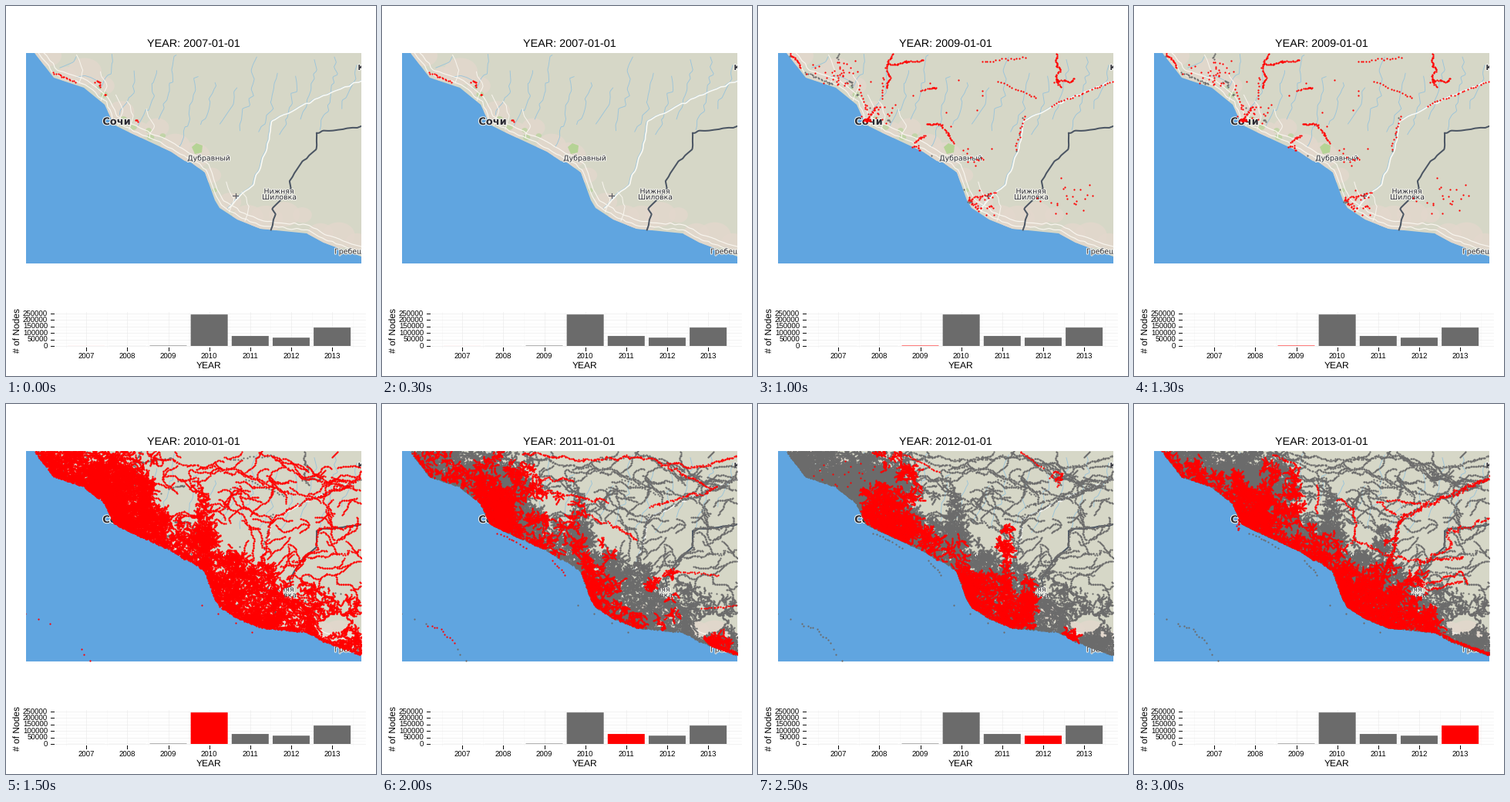
A matplotlib script for the animation above (3500 ms loop, 480 px wide and 480 px high).

```python
import numpy as np
import matplotlib.pyplot as plt
from matplotlib.animation import FuncAnimation
from matplotlib.patches import Ellipse, Polygon, Rectangle
from matplotlib.patheffects import withStroke

plt.rcParams["text.hinting"] = "none"
RED, GREY = "#ff0000", "#6b6b6b"
LEFT, TOP, RIGHT, BOTTOM = 26, 61, 461, 333.5
YEARS = range(2007, 2014)
NODES = [200, 300, 3000, 243000, 77000, 64000, 142000]
rng = np.random.default_rng(2014)

COAST = np.array([
    (37, 61), (62, 93), (101, 106), (128, 128), (140, 154), (160, 164),
    (214, 189), (232, 201), (240, 203), (258, 216), (271, 252), (277, 262),
    (300, 277), (330, 289), (390, 295), (412, 307), (461, 325)], float)
BORDER = [(461, 156), (430, 161), (403, 164), (404, 186), (385, 201),
          (368, 227), (370, 237), (345, 263), (349, 270), (344, 290)]
VALLEY = [(461, 96), (380, 130), (344, 149), (336, 190), (318, 232), (288, 262)]
CLEARINGS = [(368, 243, 10, 7), (428, 284, 16, 12)]


# --- geometry ---
def shore_y(x):
    return np.interp(x, *COAST.T)


def wiggle(pts, step=1.3, amp=1.0):
    """Resample a path and let it wander slightly."""
    pts = np.asarray(pts, float)
    dist = np.r_[0, np.cumsum(np.hypot(*np.diff(pts, axis=0).T))]
    at = np.linspace(0, dist[-1], max(2, int(dist[-1] / step)))
    knots = np.linspace(0, dist[-1], max(3, int(dist[-1] / 6)))
    return np.column_stack([
        np.interp(at, dist, axis) + np.interp(at, knots, rng.normal(0, amp, len(knots)))
        for axis in pts.T])


def walks(x, y, heading, steps, turn, step):
    """Winding lines of dots from each start, of varied length."""
    n = len(x)
    angle = heading[:, None] + rng.normal(0, turn, (n, steps)).cumsum(axis=1)
    px = x[:, None] + step * np.cos(angle).cumsum(axis=1)
    py = y[:, None] + step * np.sin(angle).cumsum(axis=1)
    keep = np.arange(steps) < rng.integers(steps // 2, steps + 1, (n, 1))
    return np.c_[px[keep], py[keep]]


def blocks(x0, x1, depth, n, size=6, streets=6):
    """City blocks scattered over a band between the shore and the hills."""
    x = rng.uniform(x0, x1, n)
    y = shore_y(x) - depth * rng.random(n) ** 1.2
    reach = np.repeat(size * rng.uniform(0.4, 1, n), streets)
    reach *= np.sqrt(rng.random(n * streets))
    turn = rng.uniform(0, 2 * np.pi, n * streets)
    x = np.repeat(x, streets) + reach * np.cos(turn)
    y = np.repeat(y, streets) + reach * np.sin(turn)
    return walks(x, y, 2 * turn, 9, 0.3, 1.2)


def shore(x0, x1, width):
    line = wiggle(COAST, 0.3, 0)
    line = line[(line[:, 0] > x0) & (line[:, 0] < x1)]
    return line + rng.uniform(-width, width, line.shape)


def trail(*pts, step=1.2, amp=1.6, thick=0.5):
    line = wiggle(pts, step, amp)
    return line + rng.normal(0, thick, line.shape)


def dotted(*pts, step=3.5):
    return trail(*pts, step=step, amp=0.6)


def sprinkle(x, y, spread, n):
    return rng.normal((x, y), (spread, spread / 2), (n, 2))


def hill_paths(n):
    x, y = rng.uniform(180, RIGHT, n), rng.uniform(TOP, 290, n)
    heading = rng.normal(0, 0.6, n) + np.pi * rng.integers(0, 2, n)
    return walks(x, y, heading, 36, 0.28, 1.5)


def ashore(*parts):
    p = np.vstack(parts)
    x, y = p.T
    keep = (x < RIGHT) & (y > TOP) & (y < shore_y(x) + 1)
    for cx, cy, rx, ry in CLEARINGS:
        keep &= np.hypot((x - cx) / rx, (y - cy) / ry) > 1
    return p[keep]


# --- nodes added in each year ---
def nodes_2007():
    return np.vstack([
        trail((61, 86), (72, 91), (89, 98), amp=0.4, step=1.8),
        trail((116, 97), (121, 98), (122, 104), amp=0.4),
        sprinkle(129, 114.5, 0.6, 3), sprinkle(169, 149, 1.5, 4)])


def nodes_2008():
    return np.vstack([
        trail((104, 62), (103, 69), amp=0.3), sprinkle(94, 100, 1.2, 5),
        sprinkle(41, 65, 1, 2), sprinkle(146, 132, 0.5, 1),
        dotted((344, 144), (335, 188), step=12), sprinkle(274, 254, 1.5, 5),
        dotted((225, 194), (266, 238), step=30)])


def nodes_2009():
    return ashore(
        trail((173, 61), (167, 72), (169, 108)), trail((168, 74), (212, 71)),
        trail((38, 62), (55, 76)), trail((213, 110), (231, 108)),
        trail((388, 61), (385, 72), (394, 80), (386, 92), (392, 107)),
        trail((386, 96), (412, 95)), trail((218, 153), (239, 154), (252, 177)),
        trail((203, 178), (216, 168)), trail((200, 182), (213, 187)),
        trail((140, 151), (144, 141), (153, 130)), sprinkle(141, 148, 2, 30),
        dotted((312, 98), (362, 119)), dotted((380, 129), (461, 98)),
        dotted((290, 73), (347, 66)), dotted((345, 144), (334, 185)),
        dotted((274, 251), (307, 242), step=2), dotted((274, 250), (286, 265), step=2),
        dotted((130, 104), (141, 135)), dotted((162, 92), (162, 120)),
        sprinkle(108, 88, 18, 40), sprinkle(155, 140, 15, 20),
        sprinkle(280, 197, 12, 12), sprinkle(295, 258, 15, 25),
        sprinkle(398, 252, 24, 24), sprinkle(250, 125, 30, 8))


def nodes_2010():
    land = ashore(
        hill_paths(165), shore(37, 350, 5), shore(350, RIGHT, 3),
        blocks(40, 130, 45, 150), blocks(115, 185, 85, 260), blocks(130, 190, 120, 60),
        blocks(185, 262, 45, 80), blocks(245, 275, 100, 45), blocks(258, 345, 80, 170),
        blocks(340, 400, 60, 65), blocks(395, RIGHT, 65, 45),
        trail(*VALLEY), trail(*BORDER[:6]), trail((190, 70), (310, 92), (375, 118)),
        trail((330, 61), (385, 95), (461, 112)), trail((370, 205), (461, 190)))
    sea = [dotted((26, 271), (57, 285), step=9), dotted((97, 317), (108, 333), step=6),
           dotted((253, 261), (320, 296), step=16)]
    return np.vstack([land, *sea])


def nodes_2011():
    land = ashore(
        shore(40, 62, 4), shore(125, 215, 5), shore(260, 342, 4), shore(425, RIGHT, 3),
        blocks(125, 172, 50, 120), blocks(45, 130, 35, 28), blocks(140, 200, 100, 45),
        blocks(190, 255, 80, 32), blocks(250, 300, 110, 14), blocks(262, 285, 45, 32),
        blocks(290, 340, 60, 18), blocks(345, 380, 80, 12), blocks(425, 450, 14, 16),
        trail((180, 63), (260, 72), (340, 68), (390, 90), (425, 108)),
        trail((372, 76), (405, 82), (461, 68)), trail((348, 133), (436, 107)),
        trail((186, 82), (205, 98), (248, 97)), trail((205, 112), (293, 127)),
        trail((250, 140), (315, 165), (331, 178)),
        dotted((380, 216), (437, 222), step=2.2), dotted((415, 265), (461, 262), step=2.2))
    sea = [dotted((60, 287), (75, 292), (94, 309)), dotted((150, 167), (186, 186)),
           dotted((220, 203), (239, 222))]
    return np.vstack([land, *sea])


def nodes_2012():
    return ashore(
        shore(134, 200, 4), shore(258, 344, 4),
        blocks(136, 195, 45, 85), blocks(150, 212, 110, 65, 5), blocks(195, 262, 30, 25, 5),
        blocks(260, 285, 45, 50), blocks(285, 350, 60, 85), blocks(313, 327, 130, 26),
        blocks(345, 358, 65, 18, 5), blocks(398, 410, 5, 8, 4),
        trail((180, 68), (212, 110)), trail((378, 92), (396, 85), (389, 106)),
        sprinkle(388, 97, 3, 20), dotted((184, 62), (235, 88), step=2),
        dotted((340, 61), (368, 83), step=2), sprinkle(110, 90, 30, 30))


def nodes_2013():
    inland = trail((376, 203), (410, 185), (406, 165), (461, 149), thick=0.7)
    pier = trail((135, 150), (137, 164), amp=0.2, thick=1)
    return np.vstack([pier, ashore(
        inland, shore(37, 65, 4), shore(90, 260, 4), shore(258, 400, 5),
        shore(400, RIGHT, 2), blocks(132, 175, 50, 120), blocks(40, 130, 28, 28, 5),
        blocks(165, 215, 95, 65, 5), blocks(210, 262, 40, 25), blocks(262, 350, 55, 160),
        blocks(345, 392, 25, 35), blocks(300, 345, 110, 25), blocks(355, 372, 75, 18, 5),
        *[trail(*VALLEY[:5], thick=0.9) for _ in range(2)],
        trail((314, 126), (340, 143)), trail((330, 122), (372, 130)),
        trail((285, 176), (330, 195), (365, 202), (428, 199), thick=0.8),
        trail((372, 205), (366, 225), (372, 240)), trail((370, 236), (424, 218), (431, 233)),
        trail((375, 241), (425, 230)), trail((180, 66), (214, 80), (206, 110)),
        trail((240, 108), (236, 140)), trail((262, 123), (288, 135), (284, 178)))])


layers = [nodes() for nodes in (nodes_2007, nodes_2008, nodes_2009, nodes_2010,
                                nodes_2011, nodes_2012, nodes_2013)]

# --- stage ---
fig = plt.figure(figsize=(4.8, 4.8), dpi=100, facecolor="white")
ax = fig.add_axes([0, 0, 1, 1])
ax.set(xlim=(0, 480), ylim=(480, 0))
ax.axis("off")
frame = Rectangle((LEFT, TOP), RIGHT - LEFT, BOTTOM - TOP, fc="#60a5e0", ec="none")
ax.add_patch(frame)


def label(x, y, text, px, **kw):
    kw = {"ha": "center", "va": "baseline", "family": "Liberation Sans", **kw}
    return ax.text(x, y, text, fontsize=px * 0.72, **kw)


def place(x, y, text, px=9.4, **kw):
    t = label(x, y, text, px, family="DejaVu Sans", color="#2b2b33", zorder=6,
              clip_on=True, **kw)
    t.set_path_effects([withStroke(linewidth=1.5, foreground="#f4f4ee")])
    t.set_clip_path(frame)


def stroke(pts, color, px):
    line, = ax.plot(*np.asarray(pts, float).T, color=color, lw=px * 0.72)
    line.set_clip_path(frame)


def draw_map():
    land = ax.add_patch(Polygon(np.vstack([COAST, [(RIGHT, TOP)]]), fc="#d6d7c7", ec="none"))

    def spots(xs, inland, width, color):
        for x in xs:
            w = width * rng.uniform(0.6, 1.2)
            spot = Ellipse((x, shore_y(x) - inland * rng.uniform(0.3, 1)), w, 0.8 * w,
                           fc=color, ec="none", alpha=0.75)
            ax.add_patch(spot).set_clip_path(land)

    spots(np.linspace(55, 455, 18), 24, 38, "#e4d8cd")
    spots(rng.uniform(110, 410, 9), 20, 9, "#b9d39d")
    ax.add_patch(Polygon([(241, 183), (247, 178), (255, 181), (254, 190), (245, 192)],
                         fc="#b5d395", ec="none"))

    for x in np.linspace(90, 455, 15):
        y = rng.uniform(TOP, 105)
        end = min(y + rng.uniform(45, 95), shore_y(x - 20) - 15)
        stroke(wiggle([(x, y), (x - 6, (y + end) / 2), (x - 22, end)], 2, 2), "#9ac4da", 0.9)
    valley = wiggle(VALLEY, 2, 0.8)
    stroke(valley, "#a9cbdc", 1)
    stroke(valley + (1.5, 0), "#fafaf5", 1.6)

    for gap in (4, 10):
        stroke(wiggle(COAST + (gap / 2, -gap), 2, 0.7), "#f8f5ee", 1.2)
    for x in (95, 125, 145, 160, 185, 290, 310):
        y = shore_y(x) - 3
        stroke(wiggle([(x, y), (x + 6, y - 18), (x - 4, y - 38)], 2, 1), "#f8f5ee", 1)
    stroke(wiggle(BORDER, 2, 0.6), "#4b5563", 2)

    stroke([(294, 246), (301, 246)], "#55555f", 1.1)
    stroke([(297.5, 243), (297.5, 249)], "#55555f", 1.1)
    place(143.5, 154, "Сочи", 13, weight="bold")
    place(263, 200.5, "Дубравный")
    place(354, 243.5, "Нижняя")
    place(354.5, 251, "Шиловка")
    place(426, 321.5, "Гребешок", ha="left")
    place(456.5, 83, "Кр", ha="left", weight="bold")


def draw_chart():
    base, rise, first, pitch = 441, 8.4, 104.2, 53.15
    major, minor = {"color": "#ececec", "lw": 0.5}, {"color": "#f7f7f7", "lw": 0.5}
    tick = {"color": "black", "lw": 0.7}
    for i in range(8):
        ax.plot([first + pitch * (i - 0.5)] * 2, [397, 443], **minor)
    for i in range(6):
        y = base - rise * i
        ax.plot([62, 466], [y, y], **major)
        if i < 5:
            ax.plot([62, 466], [y - rise / 2] * 2, **minor)
        ax.plot([58, 62], [y, y], **tick)
        label(54, y + 3.6, str(50000 * i), 9.6, ha="right")
    bars = []
    for i, (year, count) in enumerate(zip(YEARS, NODES)):
        x = first + pitch * i
        ax.plot([x, x], [397, 443], **major)
        ax.plot([x, x], [443, 446.5], **tick)
        label(x, 458, str(year), 9.6)
        bar = Rectangle((x - 24, base), 48, -rise * count / 50000, fc=GREY, ec="none",
                        zorder=3, snap=False)
        bars.append(ax.add_patch(bar))
    label(263.5, 470, "YEAR", 12)
    label(15, 421, "# of Nodes", 12, rotation=90, va="center")
    return bars


def cloud(color, zorder):
    dots, = ax.plot([], [], "o", color=color, ms=1.6, mew=0, zorder=zorder)
    dots.set_clip_path(frame)
    return dots


draw_map()
bars = draw_chart()
title = label(243, 53, "", 14.4)
old, new = cloud(GREY, 7), cloud(RED, 8)


def update(i):
    past = np.vstack([np.empty((0, 2)), *layers[:i]])
    old.set_data(*past.T)
    new.set_data(*layers[i].T)
    title.set_text(f"YEAR: {YEARS[i]}-01-01")
    for k, bar in enumerate(bars):
        bar.set_facecolor(RED if k == i else GREY)
    return [old, new, title, *bars]


anim = FuncAnimation(fig, update, frames=len(YEARS), interval=500,
                     repeat=True, repeat_delay=0, blit=False)
plt.show()
```
